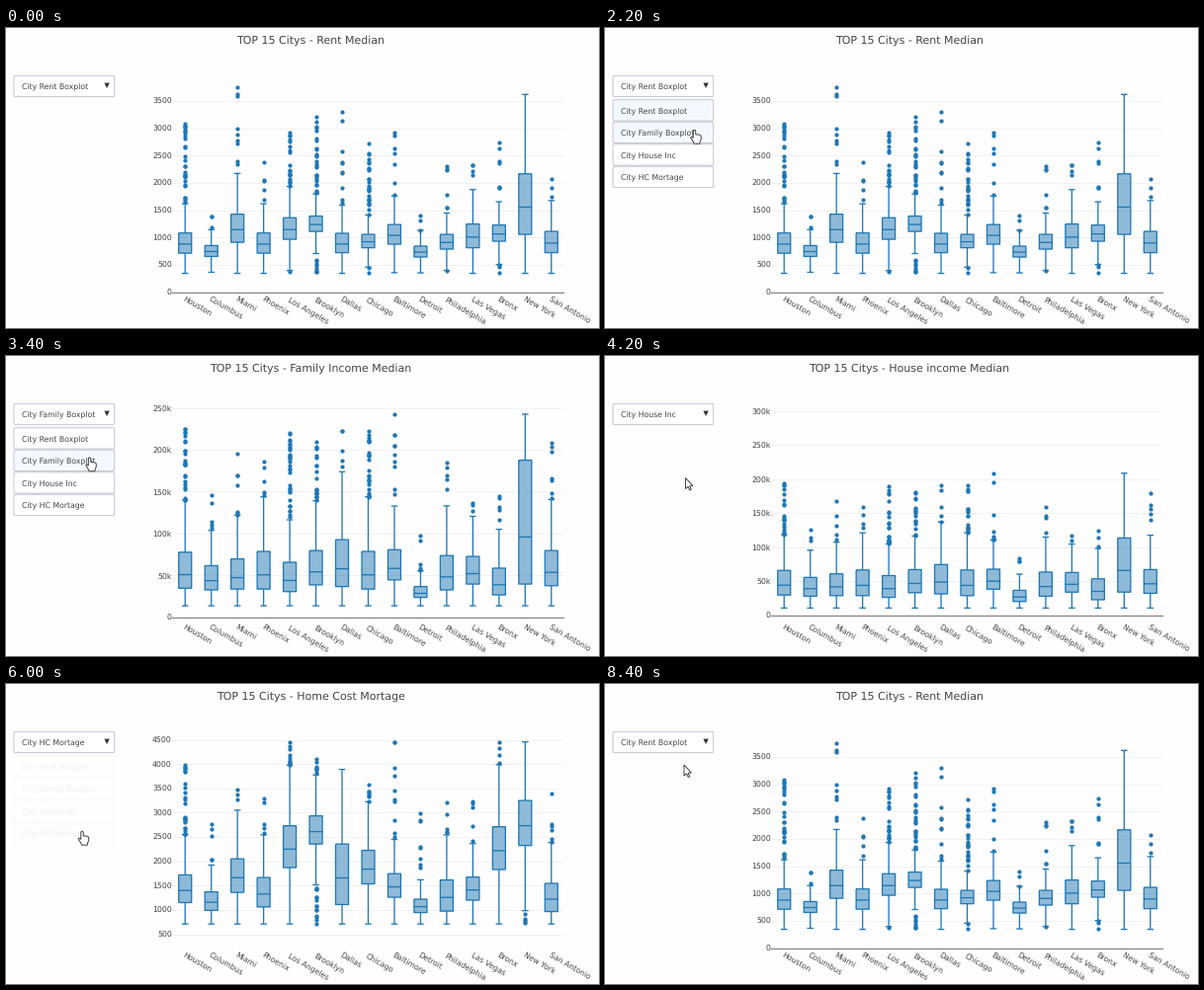
A matplotlib script for the animation above (8.9 s loop, 600x304 px).

```python
import numpy as np
import matplotlib.pyplot as plt
from matplotlib.animation import FuncAnimation
from matplotlib.collections import LineCollection
from matplotlib.patches import FancyBboxPatch, Polygon, Rectangle

W, H, DPI = 600, 304, 100
PX = 72 / DPI  # points per pixel
FRAMES, STEP_MS = 89, 100

plt.rcParams.update({"font.family": "DejaVu Sans", "path.snap": False, "text.hinting": "none"})

BLUE, INK, BORDER, TINT = "#1f77b4", "#444444", "#c0c5d0", "#f4f9ff"
LEFT, RIGHT = 168, 565
SMALL, LARGE = 7.74 * PX, 10.97 * PX
FENCE = 1.45  # whisker reach in box heights

# Lower quartile, upper quartile and maximum of rent, family income (k) and home cost
CITIES = {
    "Houston": [(720, 1090, 3090), (35, 78, 225), (1160, 1730, 4000)],
    "Columbus": [(660, 860, 1400), (33, 62, 146), (1000, 1380, 2780)],
    "Miami": [(920, 1435, 3770), (34, 70, 196), (1370, 2060, 3490)],
    "Phoenix": [(720, 1090, 2390), (34, 79, 186), (1070, 1675, 3300)],
    "Los Angeles": [(975, 1370, 2925), (31, 66, 220), (1880, 2740, 4465)],
    "Brooklyn": [(1120, 1400, 3215), (39, 80, 210), (2365, 2945, 4110)],
    "Dallas": [(730, 1085, 3305), (37, 93, 223), (1120, 2365, 3900)],
    "Chicago": [(820, 1065, 2725), (34, 79, 223), (1545, 2235, 3595)],
    "Baltimore": [(885, 1245, 2925), (45, 81, 243), (1270, 1755, 4465)],
    "Detroit": [(650, 850, 1410), (24, 37, 98), (955, 1230, 2995)],
    "Philadelphia": [(795, 1065, 2310), (33, 74, 185), (985, 1625, 3230)],
    "Las Vegas": [(820, 1255, 2340), (40, 73, 137), (1210, 1685, 3250)],
    "Bronx": [(940, 1235, 2745), (27, 59, 145), (1840, 2720, 4465)],
    "New York": [(1065, 2175, 3630), (40, 188, 243), (2335, 3260, 4465)],
    "San Antonio": [(730, 1120, 2075), (38, 80, 209), (975, 1555, 3410)],
}
LARGE_SAMPLES = {"Houston", "Los Angeles", "Brooklyn", "Chicago"}
RENT, FAMILY, COST = np.array(list(CITIES.values()), float).transpose(1, 0, 2)

# Household income follows family income, flattening in the upper quartile
HOUSE = 0.86 * FAMILY
HOUSE[:, 1] = 1.19 * FAMILY[:, 1] / (1 + FAMILY[:, 1] / 195)

PITCH = (RIGHT - LEFT) / len(CITIES)
CENTERS = LEFT + PITCH * (np.arange(len(CITIES)) + 0.5)
ITEMS = ["City Rent Boxplot", "City Family Boxplot", "City House Inc", "City HC Mortage"]

fig = plt.figure(figsize=(W / DPI, H / DPI), dpi=DPI, facecolor="#fefefe")
ax = fig.add_axes([0, 0, 1, 1])
ax.set_xlim(0, W)
ax.set_ylim(H, 0)
ax.axis("off")
rng = np.random.default_rng(4)


def label(x, y, text, size=SMALL, **kw):
    return ax.text(x, y, text, size=size, color=INK, va="baseline", **kw)


def lines(segments, color, width, z):
    return ax.add_collection(LineCollection(segments, colors=color, linewidths=width * PX, zorder=z))


def outliers(low, floor, high, peak, step, dense):
    """Scatter values beyond the whiskers, thinning out towards the extremes."""
    above = []
    if peak > high:
        count = int((peak - high) / step / (3 if dense else 11)) + 1
        above = high + (peak - high) * np.append(rng.random(count) ** 1.5, 1)
    below = rng.uniform(floor, low, int((low - floor) / step / 2.5))
    return [*above, *below]


def make_chart(title, ticks, unit, top, bottom, data, floor, mid):
    """Draw one box plot; ticks span the heights from bottom to top."""
    art = [label(308, 15.6, title, LARGE, ha="center")]
    step = (ticks[-1] - ticks[0]) / (bottom - top)  # value per pixel

    def height(value):
        return bottom - (value - ticks[0]) / step

    for tick in ticks:
        y = height(tick)
        art.append(label(167.8, y + 2.8, f"{tick}{unit if tick else ''}", ha="right"))
        y = np.floor(y) + 0.5
        color, z = ("#f1f1f1", 1) if tick else ("#84808a", 6)
        art.append(lines([[(LEFT, y), (RIGHT, y)]], color, 1 if tick else 1.2, z))

    strokes, dots = [], []
    half, cap = 6.5, 3.25
    for x, city, (q1, q3, peak) in zip(CENTERS, CITIES, data):
        reach = FENCE * (q3 - q1)
        high, low = min(q3 + reach, peak), max(q1 - reach, floor)
        extra = outliers(low, floor, high, peak, step, city in LARGE_SAMPLES)
        dots += [(x, height(v)) for v in extra]

        hi, b, m, a, lo = (height(v) for v in (high, q3, q1 + mid * (q3 - q1), q1, low))
        l, r = x - half, x + half
        art.append(ax.add_patch(Rectangle((l, b), 2 * half, a - b, lw=0, fc=BLUE, alpha=0.5, zorder=2)))
        strokes += [[(l, b), (r, b), (r, a), (l, a), (l, b)], [(l, m), (r, m)],
                    [(x, hi), (x, b)], [(x, a), (x, lo)]]
        strokes += [[(x - cap, y), (x + cap, y)] for y in (hi, lo)]
    art.append(lines(strokes, BLUE, 1.3, 3))
    art += ax.plot(*zip(*dots), "o", ms=4.2 * PX, mfc=BLUE, mew=0, zorder=4)
    return art


CHARTS = [
    make_chart("TOP 15 Citys - Rent Median", range(0, 3501, 500), "", 74.5, 268, RENT, 350, 0.45),
    make_chart("TOP 15 Citys - Family Income Median", range(0, 251, 50), "k", 53, 265, FAMILY, 14, 0.38),
    make_chart("TOP 15 Citys - House income Median", range(0, 301, 50), "k", 56, 263, HOUSE, 11, 0.4),
    make_chart("TOP 15 Citys - Home Cost Mortage", range(500, 4501, 500), "", 57, 254, COST, 720, 0.44),
]
for x, city in zip(CENTERS, CITIES):
    label(x - 2.7, 276.2, city, rotation=-30, rotation_mode="anchor", ha="left")

# Dropdown
MENU_X, MENU_W, ROW_H = 8, 101.7, 21.3
HEAD_Y, LIST_Y, ROW_STEP = 48.3, 72.7, 22.55


def button(y, text):
    box = FancyBboxPatch((MENU_X, y), MENU_W, ROW_H, boxstyle="round,pad=0,rounding_size=1.6",
                         fc="white", ec=BORDER, lw=0.95 * PX, zorder=7)
    ax.add_patch(box)
    return box, label(16, y + ROW_H / 2 + 2.6, text, zorder=8)


head_box, head_text = button(HEAD_Y, ITEMS[0])
ax.add_patch(Polygon([(99.4, 55.6), (104.8, 55.6), (102.1, 61)], fc="#333333", lw=0, zorder=8))
rows = [button(LIST_Y + i * ROW_STEP, text) for i, text in enumerate(ITEMS)]

# Pointer shapes, relative to the tip
HAND = np.array([(-1.2, 1), (0, 0.2), (1.2, 1), (1.3, 5), (4.5, 5), (6.6, 6.2), (6.8, 9.5),
                 (5.6, 12), (5.4, 14.2), (-0.3, 14.2), (-2.2, 10.5), (-3.8, 8.2), (-2.9, 7), (-1.2, 8.4)])
ARROW = np.array([(0, 0), (0, 11), (2.5, 8.7), (4.2, 12.4), (5.8, 11.7), (4.2, 8.2), (7.4, 8)])
pointer = ax.add_patch(Polygon(HAND, fc="white", ec="#333333", lw=0.9 * PX, zorder=10))

# Each visit: menu opens, pointer reaches the item, item is clicked, item position
VISITS = [(11, 19, 24, 90.5, 103), (30, 37, 39, 81, 127), (50, 54, 59, 77, 149), (70, 74, 78, 84, 83)]
HEAD = (90, 65)
ENTER, REST = (3, 128, 112), (84, 80, 82)

stops = [ENTER]
for opened, reached, clicked, x, y in VISITS:
    stops += [(opened - 2, *HEAD), (opened, *HEAD), (reached, x, y), (clicked + 2, x, y)]
PATH = np.array(stops + [REST])


def pointer_at(t):
    i = np.clip(np.searchsorted(PATH[:, 0], t, side="right") - 1, 0, len(PATH) - 2)
    a, b = PATH[i], PATH[i + 1]
    u = np.clip((t - a[0]) / (b[0] - a[0]), 0, 1)
    return a[1:] + (b[1:] - a[1:]) * u * u * (3 - 2 * u)


def menu_alpha(t):
    for opened, _, clicked, *_ in VISITS:
        if opened <= t < clicked:
            return min(1, 0.45 * (t - opened + 1))
        if clicked <= t < clicked + 2:
            return 0.5 - 0.42 * (t - clicked)
    return 0


def draw(t):
    active = sum(t >= visit[2] for visit in VISITS) % len(ITEMS)
    for i, chart in enumerate(CHARTS):
        for art in chart:
            art.set_visible(i == active)

    x, y = pointer_at(t)
    alpha = menu_alpha(t)
    present = t >= ENTER[0]
    inside = present and MENU_X <= x <= MENU_X + MENU_W
    on_head = inside and HEAD_Y <= y <= HEAD_Y + ROW_H
    on_list = inside and alpha > 0 and y > HEAD_Y + ROW_H

    head_text.set_text(ITEMS[active])
    head_box.set_facecolor(TINT if on_head else "white")
    hovered = int((y - LIST_Y) // ROW_STEP) if on_list else -1
    for i, (box, text) in enumerate(rows):
        box.set_facecolor(TINT if i in (active, hovered) else "white")
        for art in (box, text):
            art.set_alpha(alpha)
            art.set_visible(alpha > 0)

    pointer.set_visible(present)
    pointer.set_xy((HAND if on_head or on_list else ARROW) + (x, y))
    return []


anim = FuncAnimation(fig, draw, frames=FRAMES, interval=STEP_MS, repeat=True, repeat_delay=0)
plt.show()
```
